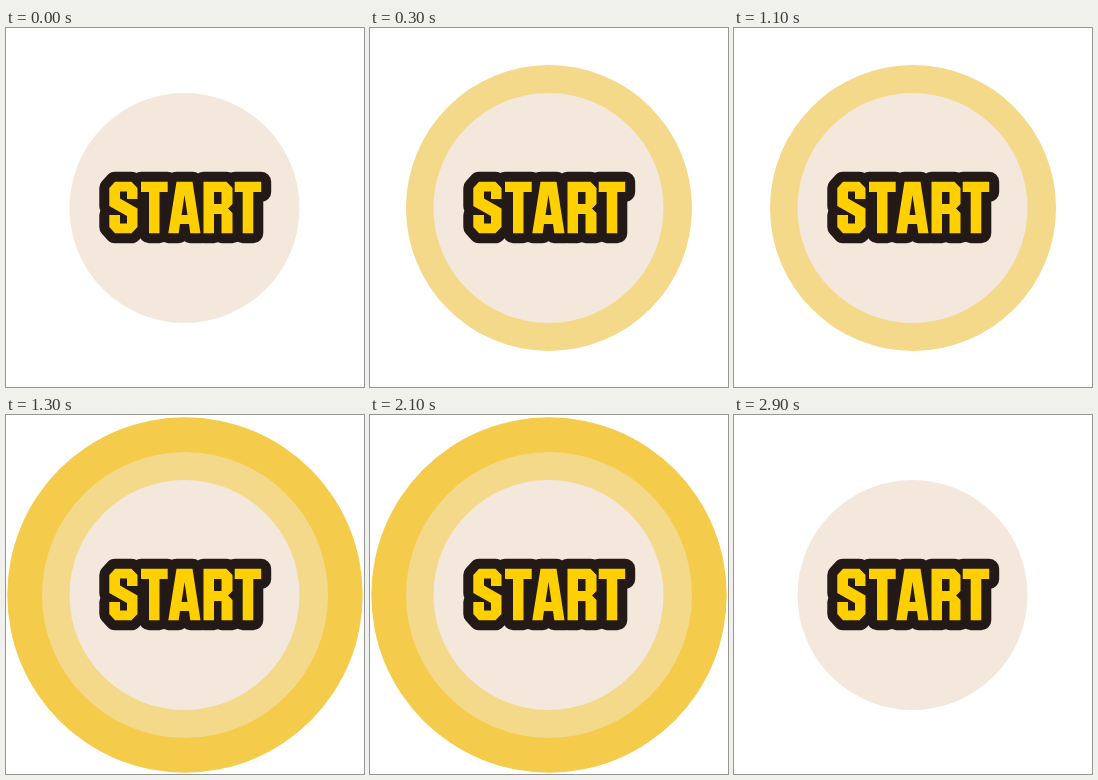
Animation, 358 px wide and 359 px high, one loop 3 s. Source, as an HTML page:

```html
<!DOCTYPE html>
<html lang="en">
<head>
<meta charset="utf-8">
<title>Start button</title>
<style>
  html, body { margin: 0; width: 100%; height: 100%; overflow: hidden; background: #fff; }
  svg { display: block; width: 100%; height: 100%; }
  .word { fill: #ffd000; fill-rule: evenodd; }
  .edge { fill: #231a17; stroke: #231a17; stroke-width: 20; stroke-linejoin: round; }
</style>
</head>
<body>
<svg viewBox="0 0 358 359" role="img" aria-label="START">
  <defs>
    <g id="word">
      <path d="M109 153.700H125.500L131.500 160V171H121V163.500H114V170.500L131.500 180.500V199L125.500 205.300H109L103.300 199V187H114V195.500H121V188L103.300 178V160Z"/>
      <path d="M135 153.700H161.700V164H153.500V205.300H143V164H135Z"/>
      <path d="M170.500 153.700H186.500L194.500 205.300H184.300L183 196H174L172.700 205.300H162.300ZM178.500 167L175.500 187H181.500Z"/>
      <path d="M197.500 153.700H220.500L226.500 160V176L222 180.500L226.500 185V205.300H215.500V186H208V205.300H197.500ZM208 164V176H215.500V164Z"/>
      <path d="M228.700 153.700H255.200V164H247.300V205.300H236.700V164H228.700Z"/>
    </g>
  </defs>
  <circle id="outer" cx="179" cy="180" r="177.700" fill="#f4cb4a"/>
  <circle id="ring" cx="179" cy="180" r="143" fill="#f4d98a"/>
  <circle id="disc" cx="178.500" cy="180" r="115" fill="#f4e8dd" stroke="#f4cb4a" stroke-width=".7"/>
  <use href="#word" class="edge"/>
  <use href="#word" class="word"/>
</svg>
<script>
  const el = id => document.getElementById(id);
  const outer = el('outer'), ring = el('ring'), disc = el('disc');
  const show = (node, on) => node.setAttribute('visibility', on ? 'visible' : 'hidden');

  function draw(now) {
    const t = now % 3000;
    show(ring, t >= 300 && t < 2300);
    show(outer, t >= 1300 && t < 2300);
    // A faint rim lingers after the rings vanish
    disc.setAttribute('stroke-opacity', t < 2300 || t >= 2900 ? 0 : t < 2500 ? 0.4 : 0.2);
    requestAnimationFrame(draw);
  }
  draw(performance.now());
</script>
</body>
</html>
```
